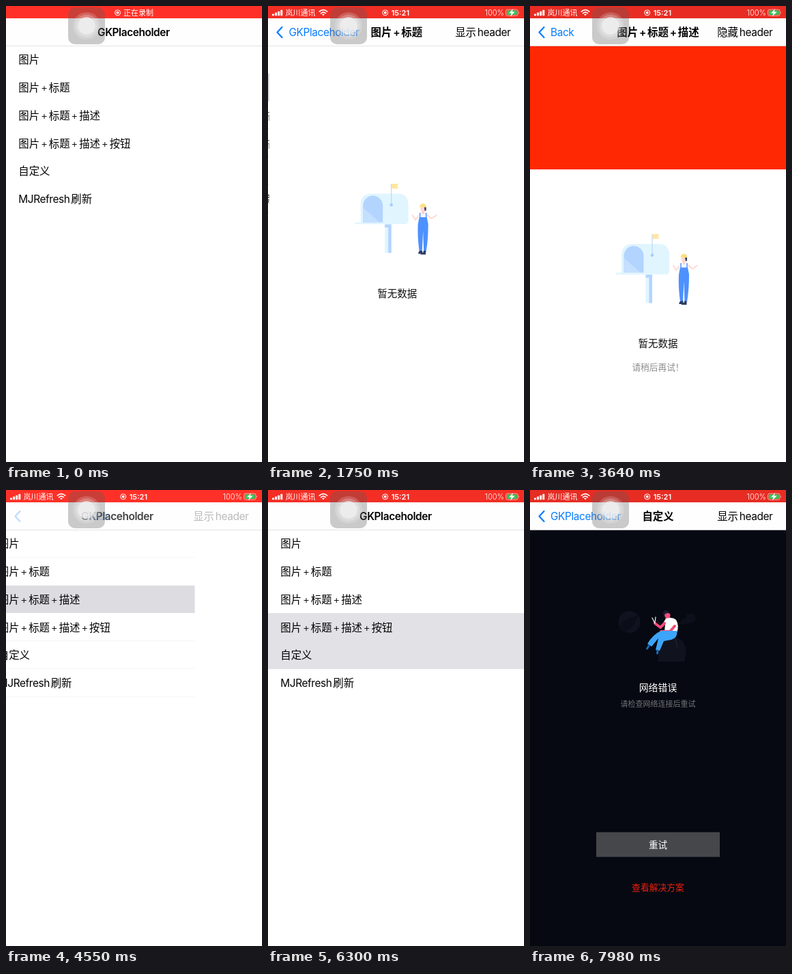
Recreate the animation shown at these times as an HTML page. Size 375 by 667 pixels, loop 8000 ms.

```html
<!DOCTYPE html>
<html lang="zh-CN">
<head>
<meta charset="utf-8">
<title>GKPlaceholder</title>
<style>
  html, body { margin: 0; width: 100%; height: 100%; overflow: hidden; background: #fff; }
  svg { display: block; width: 375px; height: 667px; }
  text { font-family: Inter, "Noto Sans CJK SC", "Noto Sans CJK", sans-serif; font-size: 15.4px; font-weight: 350; }
  .latin { letter-spacing: -.4px; font-weight: 400; }
  .mid { text-anchor: middle; }
  .end { text-anchor: end; }
  .bold, .bold .latin { font-weight: 600; }
</style>
</head>
<body>
<svg id="stage" viewBox="0 0 375 667" xmlns="http://www.w3.org/2000/svg"></svg>
<script>
const LOOP = 8000, W = 375, TOP = 58, ROW = 40.77, SLIDE = 420, HEADER = 181, PULSE = 2270;
const stage = document.getElementById('stage');

// press: row touched, push/pop: transition starts, header: time span of the red header
const visits = [
  { title: '图片', press: 180, push: 250, pop: 840, y: -57 },
  { title: '图片+标题', press: 1300, push: 1400, pop: 2080, y: -74 },
  { title: '图片+标题+描述', press: 2530, push: 2650, pop: 4400, y: -91, back: 'Back', header: [3480, 4080] },
  { title: '图片+标题+描述+按钮', press: 4930, push: 5018, pop: 5750, y: -118, back: 'Back', titleX: 180 },
  { title: '自定义', press: 6240, push: 6350, pop: Infinity, y: 0, header: [6950, 7700] },
];
const rows = [...visits.map(v => v.title), 'MJRefresh刷新'];

const clamp = x => Math.max(0, Math.min(1, x));
const ramp = (t, a, b) => clamp((t - a) / (b - a));
const easeOut = x => 1 - (1 - x) ** 3;
const mix = (a, b, k) => a + (b - a) * k;
const rgb = (a, b, k) => `rgb(${a.map((v, i) => Math.round(mix(v, b[i], k)))})`;

// Splits mixed text into runs, with a little air between scripts
function runs(s) {
  return s.match(/[A-Za-z]+|\+|[^A-Za-z+]+/g).map((r, i) =>
    `<tspan${i ? ' dx="1.8"' : ''}${/[A-Za-z]/.test(r) ? ' class="latin"' : ''}>${r}</tspan>`).join('');
}
const text = (s, x, y, cls = '', extra = '') =>
  `<text x="${x}" y="${y}" class="${cls}" ${extra}>${runs(s)}</text>`;
// Centred line whose glyphs are vertically centred on cy
const line = (s, cy, size, fill) =>
  text(s, 187.5, cy + size * .37, 'mid', `style="font-size:${size}px" fill="${fill}"`);
const rect = (x, y, w, h, fill, extra = '') =>
  `<rect x="${x}" y="${y}" width="${w}" height="${h}" fill="${fill}" ${extra}/>`;
const path = (d, fill, extra = '') => `<path d="${d}" fill="${fill}" ${extra}/>`;
const stroke = (d, color, w) =>
  path(d, 'none', `stroke="${color}" stroke-width="${w}" stroke-linecap="round" stroke-linejoin="round"`);
const circle = (x, y, r, fill, extra = '') => `<circle cx="${x}" cy="${y}" r="${r}" fill="${fill}" ${extra}/>`;

const mailbox = () =>
  path('M134 393V365Q134 348.500 151 348.500H188Q204 348.500 204 365V388Q204 393 199 393Z', '#e1f5ff') +
  rect(125.500, 390.500, 45, 2.800, '#e1f5ff', 'rx="1.200"') +
  path('M137.500 390.500V366A14.500 14.500 0 0 1 166.500 366V390.500Z', '#b3d4ff') +
  path('M137.500 369L162 390.500H137.500Z', '#c5dfff') +
  rect(169.500, 393, 9.500, 42, '#e1f5ff') +
  path('M169.500 393.500H179V435H174.500V398H169.500Z', '#b3d4ff') +
  stroke('M179 334.500V365', '#b9d8ff', 1.200) + circle(179, 365, 2.200, '#a5cbff') +
  path('M179.500 334H189.500L187.500 337.500L189.500 341H179.500Z', '#ffe6a0') +
  stroke('M220 379L214 387L210 380M231 379L238 385L245 380', '#ffd9d5', 2) +
  path('M219 377Q225 374 231 377L232 388H218Z', '#f3f6ff') +
  rect(223.500, 372, 4, 6, '#ffcfc8') + circle(225.500, 370.500, 4, '#ffd8d0') +
  path('M227 368H230V373L228 374Z', '#30406b') +
  path('M220.500 368.500Q221 363 225.500 363Q230 363 230.500 368.500Z', '#ffdf83') +
  path('M220 383H231L233 393Q233 416 230 433H226.500L225.500 403L224 433H220Q217 411 218 393Z', '#4d91ff') +
  stroke('M221 377V384M230 377V384', '#4d91ff', 1.400) +
  path('M220.500 432H224.500V436.500H218.500Q218 434 220.500 432ZM226 432H229.500V437.500H221.500Q223 434.500 226 434Z', '#2c3d68');

const night = () =>
  circle(145.500, 193, 16, '#10131f') + path('M131 199Q139 187 158 184Q151 205 138 207Z', '#0b0e18') +
  path('M219 196Q222 186 228 188Q229 178 235 181Q242 179 243 190Q239 197 219 196Z', '#0d101b') +
  path('M188 251Q186 216 209 214.500Q227 216 229 237L226 251Z', '#10131e') +
  stroke('M184 190L212 214L216 230', '#242836', 1) +
  path('M195 180Q196 174 202 177Q207 180 204 187L196 186Z', '#171b31') +
  path('M197 182Q203 178 205.500 182L205 189H199Z', '#f44b78') +
  path('M199 188Q209 185 214 190Q219 198 215 209L197 207L198 197L193 198Z', '#fff') +
  stroke('M197 195L191 201L183 195M212 199L205 207L192 207', '#f44b78', 4) +
  stroke('M183 195L179 187M183 194L184 186', '#e8e8ee', 1.300) +
  path('M192 206L215 206Q217 216 207 219L196 221L190 235L184 234L188 217L178 229L172 225Q180 211 192 206Z', '#3ca5fa') +
  stroke('M174 228L171.500 232M187 235L186.500 239', '#1769b5', 3);

function pageBody(v, i) {
  if (i === 4) {
    return night() + line('网络错误', 289, 13.9, '#fff') +
      line('请检查网络连接后重试', 312.5, 11, '#74757a') +
      rect(97, 500.5, 181, 36.2, '#46474b') + line('重试', 518.5, 13.6, '#fff') +
      line('查看解决方案', 581.5, 12.8, '#ee200d');
  }
  return mailbox() +
    (i > 0 ? line('暂无数据', 494.5, 14.5, '#111') : '') +
    (i > 1 ? line('请稍后再试！', 528.5, 12.7, '#8c8c8c') : '') +
    (i > 2 ? rect(133.2, 555, 108.7, 36, '#fff', 'stroke="#222"') + line('点击重试', 573, 12.7, '#111') : '');
}

const rowY = i => Math.round(TOP + ROW * i);
const list = rows.map((s, i) =>
  rect(0, rowY(i), W, rowY(i + 1) - rowY(i), '#e1e1e6', `id="row${i}"`)).join('') +
  `<g id="lines">${rows.map((s, i) => rect(18, rowY(i + 1) - 1, 357, 1, '#e4e4e6')).join('')}</g>` +
  rows.map((s, i) => text(s, 18.3, TOP + ROW * i + 26.4)).join('');

const pages = visits.map((v, i) =>
  `<g id="page${i}">${rect(0, TOP, W, 609, i === 4 ? '#060912' : '#fff')}
   <g id="body${i}">${pageBody(v, i)}</g>${rect(0, TOP, W, HEADER, '#ff2803', `id="head${i}"`)}</g>`).join('');

const titles = visits.map((v, i) =>
  `<g id="title${i}">${text(v.title, v.titleX || 187.5, 44.2, 'mid bold')}</g>`).join('');

const small = 'style="font-size:11px" fill="#fff"';
const bars = [0, 1, 2, 3].map(i => rect(6 + i * 4.1, 11.5 - i * 1.9, 3, 2.8 + i * 1.9, '#fff', 'rx=".7"')).join('');
const wifi = stroke('M75.300 8.200Q81 3 86.700 8.200M77.600 10.600Q81 7.600 84.400 10.600', '#fff', 1.700) +
  path('M79 12.200Q81 10.800 83 12.200L81 14.300Z', '#fff');
const battery = rect(348.5, 5.2, 17.5, 9, 'none', 'rx="2.4" stroke="#fff" stroke-opacity=".65" stroke-width=".9"') +
  rect(349.8, 6.5, 14.9, 6.4, '#35c759', 'rx="1.3"') +
  path('M367.200 8.200Q369 9.700 367.200 11.200Z', '#fff', 'opacity=".7"') +
  path('M359 4L353 10.500H356.500L355 15.500L361.500 8.600H357.700Z', '#fff');

stage.innerHTML = `
<defs>
  <linearGradient id="fade" gradientUnits="userSpaceOnUse" x1="249" x2="264" y1="0" y2="0">
    <stop stop-color="#fff"/><stop offset="1" stop-color="#000"/></linearGradient>
  <mask id="cut" maskUnits="userSpaceOnUse" x="60" y="18" width="204" height="40">
    ${rect(60, 18, 204, 40, 'url(#fade)')}</mask>
</defs>
${rect(0, 0, W, 667, '#fff')}
<g id="list">${list}</g>
${pages}
${rect(0, 18, W, 40, '#fefefe')}${rect(0, 58, W, .8, '#dededf')}
<g id="root">${text('GKPlaceholder', 134, 44.2, 'bold')}</g>
<g mask="url(#cut)">${titles}</g>
<g id="nav">
  ${stroke('M20.500 31L13.500 38.500L20.500 46', '#087cff', 2.200)}
  <g id="back" fill="#087cff">${text('GKPlaceholder', 30, 44.2, '', 'id="backLong"')}${text('Back', 30, 44.2, '', 'id="backShort"')}</g>
  ${text('显示header', 355.5, 44.2, 'end', 'id="show"')}${text('隐藏header', 355.5, 44.2, 'end', 'id="hide"')}
</g>
<rect id="bar" width="375" height="18"/>
<g id="sides">${bars}${text('岚川通讯', 25.5, 13.9, '', small)}${wifi}
  <text x="345.800" y="13.600" class="end" ${small}>100%</text>${battery}</g>
<g id="dot">${circle(0, 9.8, 4, 'none', 'stroke="#fff"')}${circle(0, 9.8, 2, '#fff')}</g>
<g id="rec">${text('正在录制', 172, 13.9, '', small)}</g>
<g id="clock"><text x="0" y="13.700" class="bold" ${small}>15:21</text></g>
${rect(91, 2, 54, 54, '#5a5a5a', 'rx="10" opacity=".32"')}
${circle(118, 29, 20, '#fff', 'opacity=".17"')}${circle(118, 29, 16.5, '#fff', 'opacity=".22"')}${circle(118, 29, 12.8, '#f0f0f0', 'opacity=".75"')}`;

const el = {};
stage.querySelectorAll('[id]').forEach(e => el[e.id] = e);
const move = (id, x, y = 0) => el[id].setAttribute('transform', `translate(${x} ${y})`);
const alpha = (id, a) => el[id].setAttribute('opacity', a);
const show = (id, on) => el[id].setAttribute('display', on ? 'inline' : 'none');

const slide = (v, t) => t < v.pop
  ? easeOut(ramp(t, v.push, v.push + SLIDE))
  : 1 - easeOut(ramp(t, v.pop, v.pop + SLIDE));

function draw(t) {
  let cur = 0;
  visits.forEach((v, i) => { if (t >= v.push) cur = i; });
  const now = visits[cur], p = slide(now, t);
  const open = !!now.header && t >= now.header[0] && t < now.header[1];

  move('list', -.3 * W * p);
  alpha('lines', clamp(p * 1.6 - .1));
  rows.forEach((s, i) => {
    const v = visits[i], next = visits[i + 1];
    show('row' + i, v && t >= v.press && !(next && t >= next.push));
    el['row' + i].setAttribute('fill', rgb([225, 225, 230], [206, 206, 211], p));
  });

  visits.forEach((v, i) => {
    const on = i === cur && p > 0;
    show('page' + i, on);
    show('title' + i, on);
    if (!on) return;
    move('page' + i, W * (1 - p));
    move('body' + i, 0, v.y + (open ? HEADER / 2 : 0));
    show('head' + i, open);
    move('title' + i, 187 * (1 - p));
    alpha('title' + i, p);
  });

  move('root', -91 * p);
  alpha('root', 1 - p);
  alpha('nav', p);
  move('back', 118 * (1 - p));
  show('backLong', !now.back);
  show('backShort', now.back);
  show('show', !open);
  show('hide', open);

  // Status bar: pulsing red, recording label turning into the clock
  const pulse = .5 - .5 * Math.cos((t / PULSE - .03) * 2 * Math.PI);
  el.bar.setAttribute('fill', rgb([255, 48, 39], [231, 44, 35], pulse));
  const k = ramp(t, 1040, 1190);
  move('dot', mix(163.5, 171.7, k));
  move('rec', 9 * k);
  alpha('rec', clamp(1 - 1.2 * k));
  move('clock', mix(174.5, 180.7, k));
  alpha('clock', clamp(k * 1.8));
  alpha('sides', ramp(t, 1180, 1330));
}

const start = performance.now();
function tick() {
  draw((performance.now() - start) % LOOP);
  requestAnimationFrame(tick);
}
tick();
</script>
</body>
</html>
```
